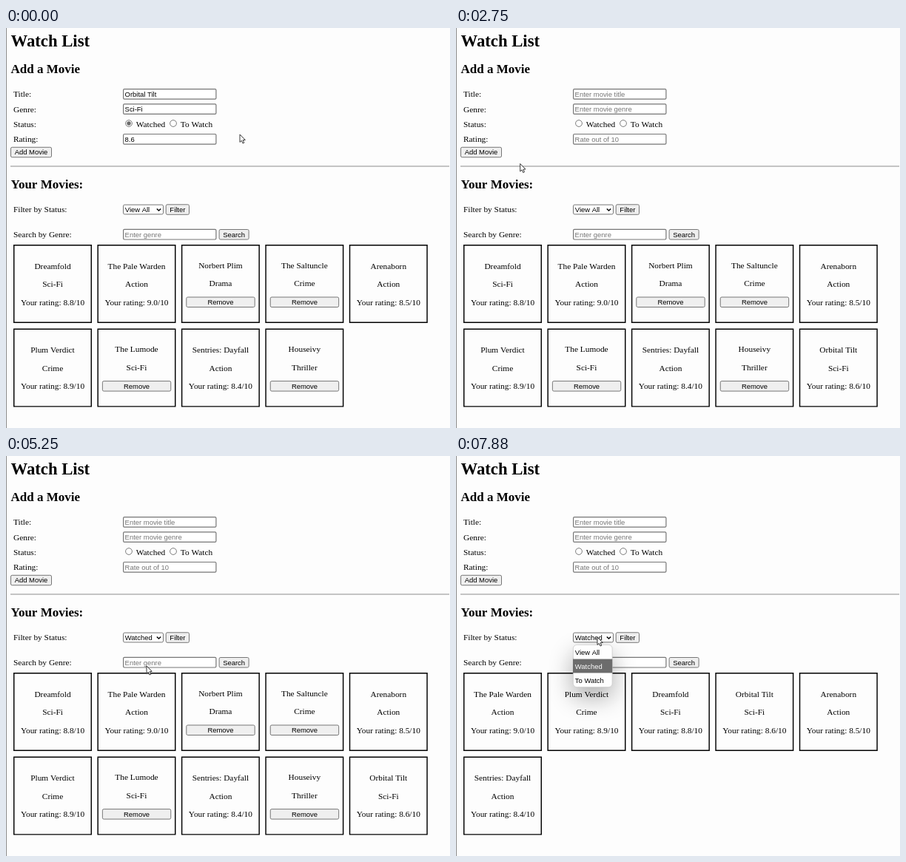
Recreate the animation shown at these times as an HTML page with a canvas. Size 600x541 px, loop 8 s.

```html
<!DOCTYPE html>
<html lang="en">
<head>
<meta charset="utf-8">
<title>Watch List</title>
<style>
  html, body { margin: 0; width: 100%; height: 100%; overflow: hidden; background: #fdfdfd; }
  canvas { display: block; width: 600px; height: 541px; }
</style>
</head>
<body>
<canvas id="stage" width="600" height="541"></canvas>
<script>
const ctx = document.getElementById('stage').getContext('2d');
const LOOP = 8000, STEP = 125;
const SERIF = '"Liberation Serif", Times, serif';
const SANS = '"Liberation Sans", Arial, sans-serif';
const BODY = `11.35px ${SERIF}`, FORM = `9.45px ${SANS}`;

// Moments at which the page state changes, in ms
const ADDED = 1875, OPEN = 4000, PICKED = 5250, FILTERED = 6250, REOPEN = 7625;

const movies = [
  ['Dreamfold', 'Sci-Fi', 8.8],
  ['The Pale Warden', 'Action', 9.0],
  ['Norbert Plim', 'Drama'],
  ['The Saltuncle', 'Crime'],
  ['Arenaborn', 'Action', 8.5],
  ['Plum Verdict', 'Crime', 8.9],
  ['The Lumode', 'Sci-Fi'],
  ['Sentries: Dayfall', 'Action', 8.4],
  ['Houseivy', 'Thriller'],
  ['Orbital Tilt', 'Sci-Fi', 8.6]
].map(([title, genre, rating]) => ({ title, genre, rating }));
const newest = movies[movies.length - 1];
const watched = movies.filter(m => m.rating).sort((a, b) => b.rating - a.rating);

// Pointer stops: time, x, y
const stops = [
  [125, 316, 144], [1000, 58, 156], [1500, 46, 161], [2375, 46, 161],
  [3500, 203, 248], [4250, 203, 248], [4625, 199, 272], [4875, 190, 284],
  [5250, 190, 284], [5875, 223, 248], [6500, 223, 248], [7125, 191, 245]
];

function pointerAt(t) {
  const next = stops.findIndex(s => s[0] > t);
  if (next === 0) return { x: stops[0][1], y: stops[0][2] };
  if (next < 0) { const [, x, y] = stops[stops.length - 1]; return { x, y }; }
  const [t0, x0, y0] = stops[next - 1], [t1, x1, y1] = stops[next];
  const p = (t - t0) / (t1 - t0), e = p * p * (3 - 2 * p);
  return { x: x0 + (x1 - x0) * e, y: y0 + (y1 - y0) * e };
}

function text(str, x, y, font = BODY, color = '#000', align = 'left') {
  ctx.font = font;
  ctx.fillStyle = color;
  ctx.textAlign = align;
  ctx.fillText(str, x, y);
}

function box(x, y, w, h, fill, stroke, radius = 1.8, line = 1) {
  ctx.beginPath();
  ctx.roundRect(x + line / 2, y + line / 2, w - line, h - line, radius);
  ctx.fillStyle = fill;
  ctx.fill();
  ctx.lineWidth = line;
  ctx.strokeStyle = stroke;
  ctx.stroke();
}

const inside = (p, x, y, w, h) => p.x >= x && p.x <= x + w && p.y >= y && p.y <= y + h;

function button(label, x, y, w, pointer, pressed) {
  const hover = pointer && inside(pointer, x, y, w, 14.5);
  const fill = pressed ? '#f7f7f7' : hover ? '#e3e3e3' : '#efefef';
  const edge = pressed ? '#999' : hover ? '#4f4f4f' : '#767676';
  box(x, y, w, 14.5, fill, edge);
  text(label, x + w / 2, y + 10.6, FORM, '#000', 'center');
}

function input(y, value, placeholder, edge = '#767676') {
  box(158, y, 126.5, 14.8, '#fff', edge, 1.4, 1.2);
  text(value || placeholder, 160.6, y + 10.7, FORM, value ? '#000' : '#757575');
}

function radio(x, checked) {
  ctx.beginPath();
  ctx.arc(x, 129, 4.4, 0, Math.PI * 2);
  ctx.fillStyle = '#fff';
  ctx.fill();
  ctx.lineWidth = 0.9;
  ctx.strokeStyle = '#707070';
  ctx.stroke();
  if (!checked) return;
  ctx.beginPath();
  ctx.arc(x, 129, 2.7, 0, Math.PI * 2);
  ctx.fillStyle = '#6b6b6b';
  ctx.fill();
}

function select(value, hover) {
  box(158, 238.6, 55, 13.8, '#fff', hover ? '#4f4f4f' : '#767676');
  text(value, 160.8, 249, FORM);
  ctx.beginPath();
  ctx.moveTo(203.8, 244.4);
  ctx.lineTo(206.5, 247.1);
  ctx.lineTo(209.2, 244.4);
  ctx.lineWidth = 1.4;
  ctx.strokeStyle = '#000';
  ctx.stroke();
}

function card(movie, i) {
  const x = 10 + 113.45 * (i % 5), y = 293 + 113.6 * Math.floor(i / 5), mid = x + 53;
  box(x, y, 106, 106, '#fdfdfd', '#000', 0, 1.45);
  const line = (str, dy) => text(str, mid, y + dy, BODY, '#000', 'center');
  const lift = movie.rating ? 0 : 1.1;
  line(movie.title, 32.7 - lift);
  line(movie.genre, 57.2 - lift);
  if (movie.rating) line(`Your rating: ${movie.rating.toFixed(1)}/10`, 81.7);
  else button('Remove', x + 6.4, y + 70.5, 93.4);
}

function menu(active) {
  ctx.save();
  ctx.shadowColor = 'rgba(0,0,0,0.32)';
  ctx.shadowBlur = 32;
  ctx.shadowOffsetY = 13;
  box(158, 255, 53.5, 58, '#fff', '#c4c4c4', 5, 0.7);
  ctx.restore();
  ctx.save();
  ctx.beginPath();
  ctx.roundRect(158, 255, 53.5, 58, 5);
  ctx.clip();
  ['View All', 'Watched', 'To Watch'].forEach((label, i) => {
    const y = 255.6 + 19 * i;
    if (i === active) {
      ctx.fillStyle = '#6c6c6c';
      ctx.fillRect(158, y, 53.5, 18.8);
    }
    text(label, 160.8, y + 13, FORM, i === active ? '#fff' : '#000');
  });
  ctx.restore();
}

function arrow({ x, y }) {
  ctx.save();
  ctx.translate(x, y);
  ctx.beginPath();
  [[0, 0], [0, 10.4], [2.4, 8.3], [4, 12], [5.8, 11.2], [4.2, 7.6], [7.3, 7.4]]
    .forEach(([px, py]) => ctx.lineTo(px, py));
  ctx.closePath();
  ctx.fillStyle = '#fff';
  ctx.fill();
  ctx.lineWidth = 0.9;
  ctx.lineJoin = 'round';
  ctx.strokeStyle = '#222';
  ctx.stroke();
  ctx.restore();
}

function drawForm(t, pointer) {
  const filled = t < ADDED;
  text('Watch List', 6.5, 24.6, `bold 22.7px ${SERIF}`);
  text('Add a Movie', 6.5, 60.7, `bold 17px ${SERIF}`);
  ['Title:', 'Genre:', 'Status:', 'Rating:'].forEach((s, i) => text(s, 10, 93.2 + 20.35 * i));
  input(82, filled && newest.title, 'Enter movie title');
  input(102.2, filled && newest.genre, 'Enter movie genre');
  radio(166, filled);
  text('Watched', 175.7, 133.6);
  radio(226, false);
  text('To Watch', 235.8, 133.6);
  input(142.9, filled && '8.6', 'Rate out of 10', t >= 375 && t < 1250 ? '#4a4a4a' : '#767676');
  button('Add Movie', 6, 160.8, 56, pointer, t >= 1750 && t < ADDED);
}

function drawList(t, pointer) {
  const open = (t >= OPEN && t < PICKED) || t >= REOPEN;
  text('Your Movies:', 6.5, 217, `bold 17px ${SERIF}`);
  text('Filter by Status:', 10, 249.2);
  select(t < PICKED ? 'View All' : 'Watched', !open && inside(pointer, 158, 238, 55, 15));
  button('Filter', 215.7, 238.3, 32.3, pointer, t >= 6000 && t < FILTERED);
  text('Search by Genre:', 10, 283);
  input(271.8, '', 'Enter genre');
  button('Search', 287.6, 272, 41, pointer);
  const shown = t >= FILTERED ? watched : t >= ADDED ? movies : movies.slice(0, -1);
  shown.forEach(card);
  if (open) menu(t >= REOPEN || pointer.y > 274 ? 1 : 0);
}

function draw(t) {
  const pointer = pointerAt(t);
  ctx.fillStyle = '#fdfdfd';
  ctx.fillRect(0, 0, 600, 541);
  ctx.fillStyle = '#8c8c8c';
  ctx.fillRect(0, 0, 1, 541);
  ctx.fillStyle = '#a0a0a0';
  ctx.fillRect(6, 186.4, 593, 1.2);
  drawForm(t, pointer);
  drawList(t, pointer);
  arrow(pointer);
}

function tick() {
  const t = performance.now() % LOOP;
  draw(Math.floor(t / STEP) * STEP);
  requestAnimationFrame(tick);
}
tick();
</script>
</body>
</html>
```
